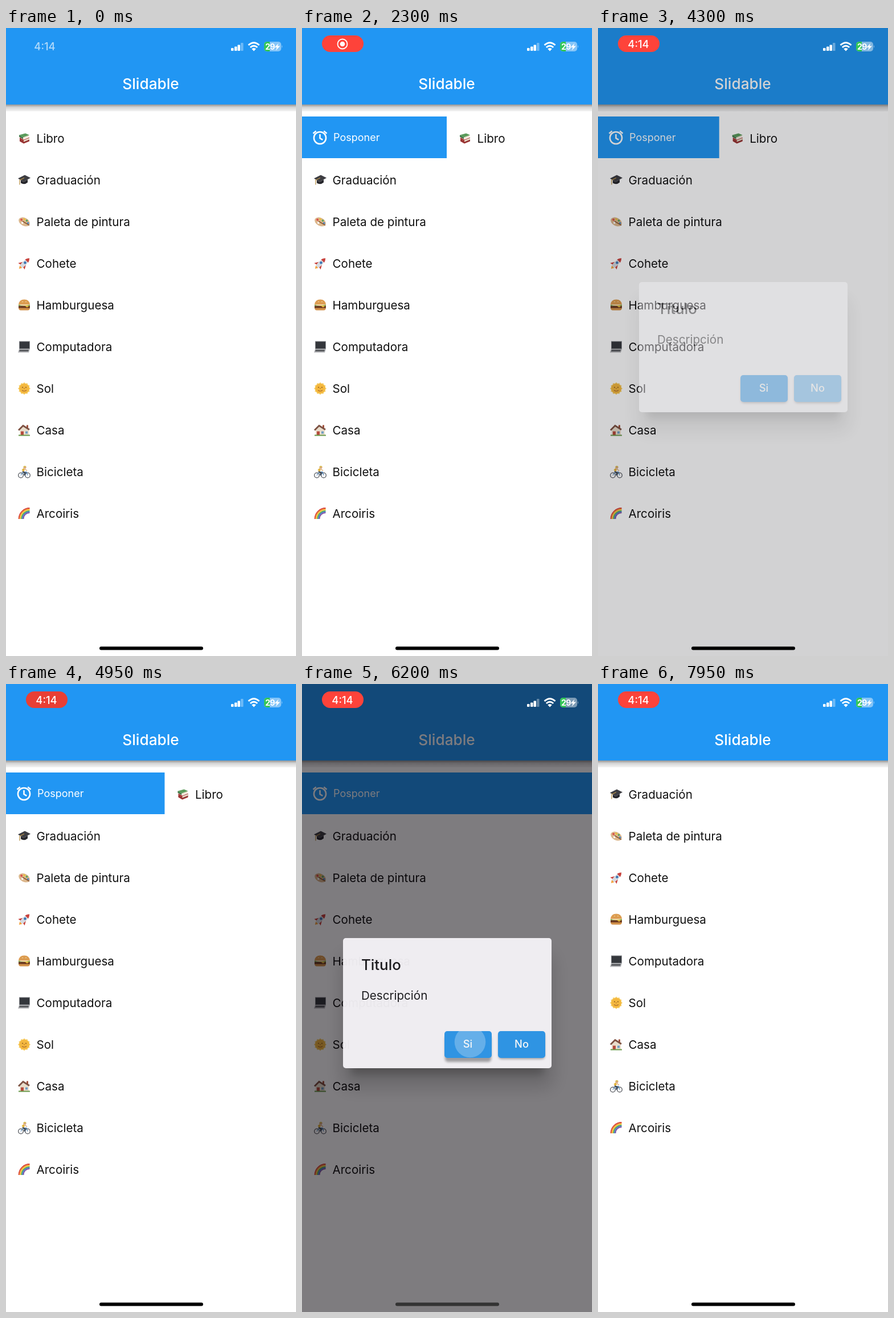
These frames come from a looping animation (509 by 1100 pixels, 8 s). An HTML page:

```html
<!DOCTYPE html>
<html lang="es">
<head>
<meta charset="utf-8">
<title>Slidable</title>
<style>
html, body { margin: 0; height: 100%; overflow: hidden; background: #fff; }
svg { display: block; width: 100vw; height: 100vh; font: 20.6px Inter, "Open Sans", sans-serif; }
.medium { font-weight: 500; }
.mid { text-anchor: middle; }
.line { fill: none; }
</style>
</head>
<body>
<svg viewBox="0 0 509 1100">
  <defs>
    <linearGradient id="barShade" x2="0" y2="1">
      <stop stop-opacity=".42"/><stop offset=".4" stop-opacity=".17"/><stop offset="1" stop-opacity=".04"/>
    </linearGradient>
    <clipPath id="paneClip"><rect id="paneBox" y="155"/></clipPath>
    <clipPath id="yesClip"><rect x="250" y="608" width="83" height="47" rx="5"/></clipPath>
    <clipPath id="noClip"><rect x="344" y="608" width="83" height="47" rx="5"/></clipPath>
  </defs>
  <rect width="509" height="1100" fill="#fff"/>

  <g id="list" fill="#111"></g>
  <g clip-path="url(#paneClip)">
    <rect y="155" width="509" height="73" fill="#2196f3"/>
    <g id="action">
      <g class="line" stroke="#fff" stroke-width="2.5">
        <circle cx="31.5" cy="192.5" r="10.6"/>
        <path d="M31.500 186v7l4.800 2.900M19.500 184.800l5.200-4.400M43.500 184.800l-5.200-4.400"/>
      </g>
      <text x="55" y="198" font-size="18" fill="#fff">Posponer</text>
    </g>
  </g>

  <rect y="134" width="509" height="12" fill="url(#barShade)"/>
  <rect width="509" height="134" fill="#2196f3"/>
  <text class="mid medium" x="254" y="107" font-size="26.2" fill="#fff">Slidable</text>

  <rect id="scrim" width="509" height="1100" fill="#050006"/>

  <g id="dialog">
    <rect x="70" y="474" width="370" height="232" rx="12" opacity=".18" style="filter:blur(16px)"/>
    <rect x="86" y="463" width="338" height="220" rx="6" opacity=".22" style="filter:blur(7px)"/>
    <rect x="72" y="445" width="366" height="228" rx="5" fill="#f7f5f9"/>
    <text class="medium" x="104" y="501" font-size="25.800" fill="#17171a">Titulo</text>
    <text x="104" y="553" fill="#17171a">Descripción</text>
    <rect id="yesShade" x="251" y="611" width="81" height="46" rx="5" style="filter:blur(2px)"/>
    <rect x="345" y="611" width="81" height="46" rx="5" opacity=".35" style="filter:blur(2px)"/>
    <g fill="#2b96ea">
      <rect x="250" y="608" width="83" height="47" rx="5"/>
      <rect x="344" y="608" width="83" height="47" rx="5"/>
    </g>
    <g fill="#fff" fill-opacity=".27">
      <circle id="yesRipple" cx="295" cy="627" clip-path="url(#yesClip)"/>
      <circle id="noRipple" cx="386" cy="631" clip-path="url(#noClip)"/>
    </g>
    <g class="mid medium" font-size="18.300" fill="#fff">
      <text x="291" y="637">Si</text><text x="385.500" y="637">No</text>
    </g>
  </g>

  <g id="pill">
    <rect id="pillBox" x="35" y="13" width="73" height="29" rx="14.500"/>
    <g id="record" fill="#fff">
      <circle class="line" cx="71" cy="28" r="8.500" stroke="#fff" stroke-width="1.800"/>
      <circle cx="71" cy="28" r="4.300"/>
    </g>
    <text id="pillTime" class="mid medium" x="71" y="34.500" font-size="18.400" fill="#fff">4:14</text>
  </g>
  <text id="clock" class="mid medium" x="68" y="39" font-size="18.400" fill="#fff">4:14</text>

  <g fill="#fff">
    <rect x="395" y="35" width="4.500" height="5" rx="1"/>
    <rect x="401" y="32.500" width="4.500" height="7.500" rx="1"/>
    <rect x="406.500" y="29.500" width="4.500" height="10.500" rx="1"/>
    <rect x="412" y="26" width="4.500" height="14" rx="1" opacity=".35"/>
    <path d="M435 40.500l-3.800-4Q435 33.500 438.800 36.500z"/>
    <path class="line" stroke="#fff" stroke-width="3" d="M425.500 30Q435 21.500 444.500 30M428.800 34Q435 28.500 441.200 34"/>
    <rect x="453" y="24" width="30" height="17" rx="5" opacity=".45"/>
    <path d="M463 24H458a5 5 0 0 0-5 5v7a5 5 0 0 0 5 5H463z" fill="#35c759"/>
    <path d="M484 30q2 2.500 0 5z" opacity=".5"/>
    <text x="455" y="38" font-size="14" font-weight="700" letter-spacing="-.6">29</text>
    <path d="M478.500 26.500L471.500 34H475.500L473.500 39.500 481 31.500H476.500z"/>
  </g>
  <rect id="home" x="164" y="1083.500" width="182" height="6" rx="3"/>
</svg>
<script>
const $ = id => document.getElementById(id);
const set = (id, attrs) => { for (const k in attrs) $(id).setAttribute(k, attrs[k]); };

// Icons, drawn around their own centre
const path = (d, fill) => `<path d="${d}" fill="${fill}"/>`;
const line = (d, color, w = 1.5) => `<path class="line" d="${d}" stroke="${color}" stroke-width="${w}"/>`;
const dot = (x, y, r, fill) => `<circle cx="${x}" cy="${y}" r="${r}" fill="${fill}"/>`;
const turn = (deg, s) => `<g transform="rotate(${deg})">${s}</g>`;

const books = path('M-8-2L-1 2 9-2V5L-1 9-8 5z', '#a83c3a') + path('M-1 3L9-1V2L-1 6z', '#e6dac6')
  + line('M-8 3L-1 7 9 3', '#7c2a2c', 1) + path('M-9-6L-2-2V1L-9-3z', '#3c7546')
  + path('M-2-2L8-6V-3L-2 1z', '#eee4d0') + path('M-9-6L2-9 9-6-2-2z', '#5b9c5c');
const cap = path('M-6 0V5Q0 9 6 4V-1L-1 3z', '#26262b') + path('M-11-3L1-9 11-4-1 3z', '#3d3d42')
  + line('M0-4L-8 0V8', '#b8934a', 1.3);
const palette = turn(28, '<ellipse rx="10.500" ry="7" fill="#dcb78d"/>' + dot(-6, -1, 2, '#d9534b')
  + dot(-2, -4, 1.8, '#e9c23f') + dot(3, -4, 1.8, '#5ba65b') + dot(7, -1, 1.8, '#4c87c7') + dot(-2, 3, 1.8, '#fff'))
  + line('M-3-1L9 6', '#8a5a34');
const rocket = turn(45, path('M-3 8H3L0 13z', '#f2a23a') + path('M-4 0L-8 7-3 6H3L8 7 4 0z', '#c8413c')
  + path('M0-13Q6-4 3 8H-3Q-6-4 0-13z', '#d5dae1') + path('M0-13Q3-10 4-6H-4Q-3-10 0-13z', '#c8413c')
  + dot(0, -2, 2.3, '#3b78b5'));
const burger = path('M-10 4H10Q10 9 6 9H-6Q-10 9-10 4z', '#d2914a') + path('M-10 1H10V5H-10z', '#6a3920')
  + path('M-10 0H10L5 4 1 1z', '#f4c242') + path('M-10-1Q0 3 10-1V1H-10z', '#6da23c')
  + path('M-10-1Q-9-10 0-10T10-1z', '#dc9c50') + dot(-3, -6, .8, '#f7e3b5') + dot(3, -6, .8, '#f7e3b5');
const laptop = path('M-9-10H10V4H-9z', '#8b8d91') + path('M-8-9H9V3H-8z', '#34373c')
  + path('M-9 4H10L8 10H-11z', '#b5b6b9') + path('M-8 5H8L7 8H-9z', '#55575b');
const rays = Array.from({ length: 12 }, (_, i) => turn(i * 30, path('M-3-8L0-11 3-8z', '#f7d06a'))).join('');
const sun = rays + dot(0, 0, 8.7, '#f4b83f') + dot(-3, -2, 1, '#8a5a22') + dot(3, -2, 1, '#8a5a22')
  + line('M-4 3Q0 6 4 3M0-1V1', '#a9682a', 1.1);
const house = path('M4-9H7V-2H4z', '#a3543f') + path('M-8-1L0-8 8-1V9H-8z', '#e8dcca')
  + line('M-10 0L-2-8 9-1', '#7d5142', 2.8) + path('M-6 2H-1V9H-6z', '#b64a3c')
  + path('M2 2H6V6H2z', '#6f9fc4') + line('M-10 9H10', '#6b9a4c', 2);
const wheel = x => `<circle class="line" cx="${x}" cy="6" r="4.300" stroke="#55585e" stroke-width="1.300"/>`;
const biker = wheel(-6) + wheel(6) + line('M-6 6L-2 0 4 0 6 6M-2 0L1 6 4 0', '#4b7fb0', 1.2)
  + line('M-3-1L2 2 0 6', '#45484f', 2.2) + line('M-3-2L0-5', '#e3b43a', 4) + line('M1-5L5-2', '#dba77c', 1.5)
  + dot(1, -8, 2.5, '#dba77c') + path('M-2-8Q0-13 4-9z', '#d9c35a');
const rainbow = ['#d8423b', '#ef8a33', '#f5cf45', '#57a856', '#3f83cc', '#8458a8'].map((c, i) => {
  const k = -9.5 + i * 1.6, r = 9.5 - k;
  return line(`M${k} 9.500A${r} ${r} 0 0 1 9.500 ${k}`, c, 1.8);
}).join('');

const rows = [['Libro', books], ['Graduación', cap], ['Paleta de pintura', palette], ['Cohete', rocket],
  ['Hamburguesa', burger], ['Computadora', laptop], ['Sol', sun], ['Casa', house],
  ['Bicicleta', biker], ['Arcoiris', rainbow]];
const ROW = 73, WIDTH = 509;
$('list').innerHTML = rows.map(([name, icon], i) =>
  `<g id="row${i}"><g transform="translate(32 193.500)">${icon}</g><text x="53.500" y="201">${name}</text></g>`).join('');

// Timing
const ramp = (t, a, b) => Math.min(1, Math.max(0, (t - a) / (b - a)));
const smooth = x => x * x * (3 - 2 * x);
const visits = [[3350, 4189], [5409, 6172]];   // dialog opens, dialog is answered
const FADE = 150;
const slide = [[500, 0], [1250, 290], [1400, 290], [1600, 254], [2650, 254], [3200, 508], [3300, 508],
  [3350, WIDTH], [4189, WIDTH], [4389, 0], [4650, 0], [5050, 330], [5200, 330], [5400, WIDTH]];

function along(keys, t) {
  let [t0, v0] = keys[0];
  for (const [t1, v1] of keys) {
    if (t < t1) return v0 + (v1 - v0) * smooth(ramp(t, t0, t1));
    [t0, v0] = [t1, v1];
  }
  return v0;
}

function draw(t) {
  const x = along(slide, t);
  const gone = smooth(ramp(t, 6200, 6500));
  rows.forEach((_, i) => set('row' + i, {
    transform: i ? `translate(0 ${ROW * (i - gone)})` : `translate(${x} 0)`
  }));
  set('paneBox', { width: x, height: ROW * (1 - gone) });
  set('action', { transform: `translate(0 ${-ROW * gone / 2})` });

  const shown = Math.max(...visits.map(([a, b]) => ramp(t, a, a + FADE) - ramp(t, b, b + FADE)));
  set('scrim', { opacity: .54 * Math.sin(shown * Math.PI / 2) ** 1.2 });
  set('dialog', { opacity: 1 - (1 - shown) ** 1.7 });
  const ripple = start => 60 * ramp(t, start, start + 220);
  set('noRipple', { r: t < 4600 ? ripple(4070) : 0 });
  set('yesRipple', { r: ripple(6100) });
  const press = ramp(t, 6080, 6180);
  set('yesShade', { opacity: .35, transform: `translate(0 ${5 * press})` });

  const grow = smooth(ramp(t, 100, 400)), swap = ramp(t, 3080, 3320);
  const glow = (1 - Math.cos((t - 1300) / 1950 * 2 * Math.PI)) / 2;
  set('clock', { opacity: .65 * (1 - ramp(t, 50, 250)) });
  set('pill', { opacity: grow });
  set('pillBox', { fill: `rgb(${228 + 26 * glow},${62 + 5 * glow},${52 + 6 * glow})` });
  set('record', { opacity: 1 - swap });
  set('pillTime', { opacity: swap });

  const lit = 62 * Math.max(...visits.map(([a, b]) => ramp(t, a + 150, a + 450) - ramp(t, b + 10, b + 110)));
  set('home', { fill: `rgb(${lit},${lit},${lit})` });
}

const begin = performance.now();
function tick() {
  const t = (performance.now() - begin) % 8000;
  draw(Math.floor(t / 50) * 50);
  requestAnimationFrame(tick);
}
tick();
</script>
</body>
</html>
```
